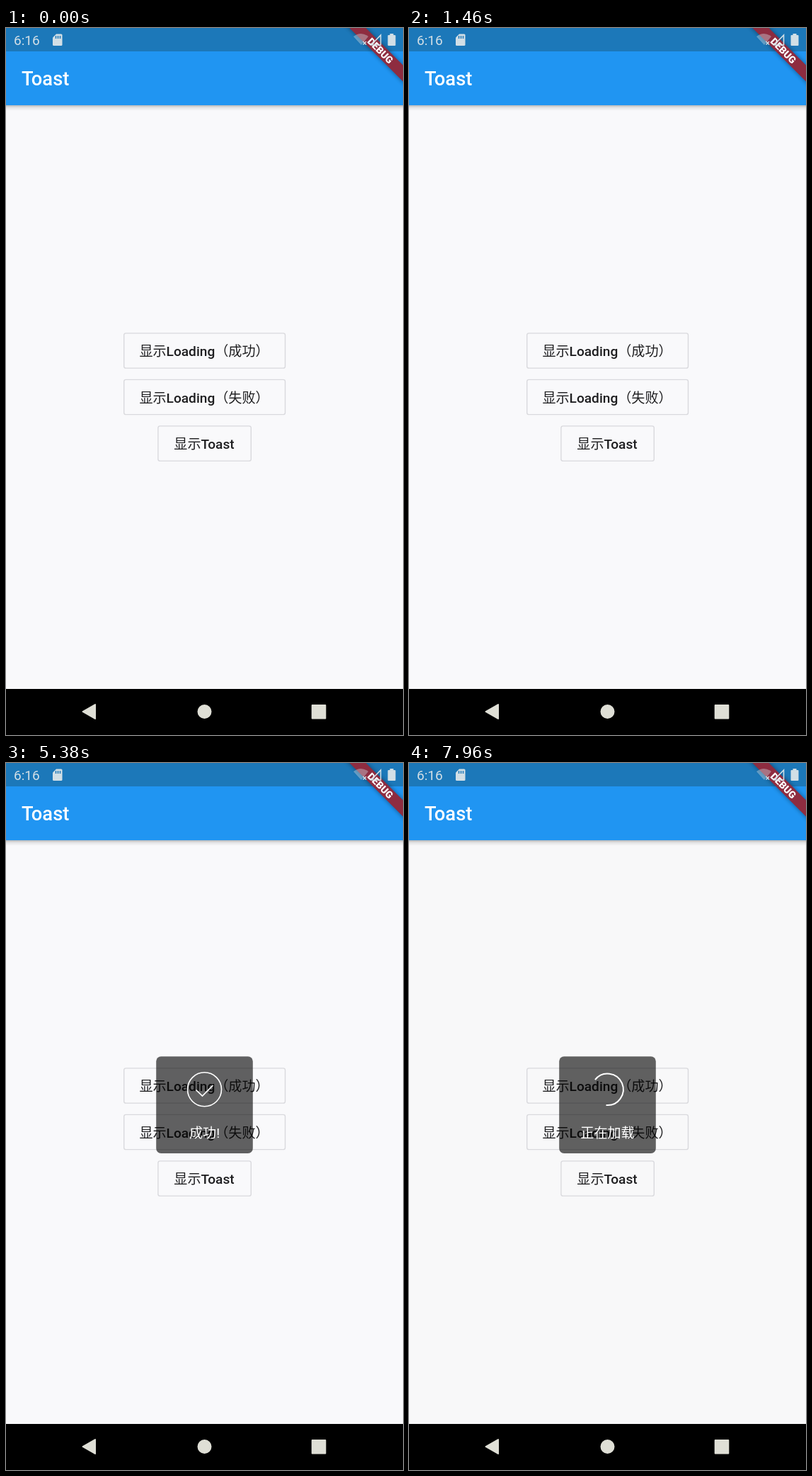
An HTML page for the animation above (8 s loop, 561 by 998 pixels).

```html
<!DOCTYPE html>
<html lang="zh-CN">
<head>
<meta charset="utf-8">
<title>Toast</title>
<style>
  html, body { margin: 0; width: 100%; height: 100%; overflow: hidden; background: #000; }
  svg { display: block; width: 100vw; height: 100vh; }
  text { font-family: Roboto, "Noto Sans CJK SC", "Noto Sans CJK", sans-serif; font-size: 19.1px; }
  .label { font-weight: 500; fill: #1e1e20; text-anchor: middle; }
  .label tspan { font-weight: 400; }
  .outline { fill: none; stroke-width: 1.37; }
  .toast text { fill: #fff; text-anchor: middle; }
  .line { fill: none; stroke: #fff; }
</style>
</head>
<body>
<svg viewBox="0 0 561 998" preserveAspectRatio="none">
  <defs>
    <linearGradient id="shade" x2="0" y2="1">
      <stop stop-color="#000" stop-opacity=".26"/>
      <stop offset=".4" stop-color="#000" stop-opacity=".09"/>
      <stop offset="1" stop-color="#000" stop-opacity="0"/>
    </linearGradient>
    <filter id="soft" x="-20%" y="-100%" width="140%" height="300%">
      <feGaussianBlur stdDeviation="3"/>
    </filter>
  </defs>

  <rect id="page" width="561" height="998" fill="#f9f9fb"/>
  <rect y="109" width="561" height="8" fill="url(#shade)"/>
  <rect width="561" height="109" fill="#2095f2"/>
  <rect width="561" height="33" fill="#1c78b9"/>
  <text x="22" y="81" fill="#fff" style="font-size:27.3px;font-weight:500">Toast</text>

  <g id="buttons"></g>

  <g class="toast" id="toast">
    <rect x="212.2" y="414.3" width="136.6" height="136.6" rx="6.8" fill="#000" fill-opacity=".61"/>
    <g id="loading">
      <path id="arc" class="line" stroke-width="2"/>
      <text x="280.5" y="529">正在加载</text>
    </g>
    <g id="success">
      <circle class="line" cx="280.5" cy="460.8" r="24" stroke-width="1.6"/>
      <path class="line" d="M268.5 461.5L277.5 470L292.5 455" stroke-width="1.7"/>
      <text x="280.5" y="529">成功!</text>
    </g>
  </g>

  <g transform="translate(529 32) rotate(45)">
    <rect x="-90" y="-8.2" width="180" height="16.4" fill="#000" opacity=".42" filter="url(#soft)"/>
    <rect x="-90" y="-8.2" width="180" height="16.4" fill="#8e2c40"/>
    <text y="4.9" text-anchor="middle" fill="#fff" style="font-size:13.9px;font-weight:900">DEBUG</text>
  </g>

  <g fill="#d2dfe6">
    <text x="11" y="24">6:16</text>
    <path d="M71 8.5H78Q79.5 8.5 79.5 10V23.5Q79.5 25 78 25H67.500Q66 25 66 23.500V13.500Z"/>
    <path d="M70.500 11v4M73.500 11v4M76.500 11v4" stroke="#1c78b9" stroke-width="1.5"/>
    <path d="M491 12Q501.500 4 512 12L507 18L502 24Z" opacity=".4"/>
    <path d="M504.500 19l4.500 4.500m0-4.500l-4.500 4.500" stroke="#d2dfe6" stroke-width="1.5"/>
    <path d="M516 24L529.500 10V24Z" fill="none" stroke="#d2dfe6" stroke-width="1.6"/>
    <path d="M542.500 8h5v2H549.500Q550.500 10 550.500 11V24Q550.500 25 549.500 25H540.500Q539.500 25 539.500 24V11Q539.500 10 540.500 10H542.500Z"/>
  </g>

  <rect y="933" width="561" height="65"/>
  <g fill="#dfdfd6" stroke="#dfdfd6" stroke-width="2" stroke-linejoin="round">
    <path d="M108.500 965L126 955V975Z"/>
    <circle cx="280.500" cy="965" r="9"/>
    <rect x="432.700" y="956" width="18.600" height="18.600"/>
  </g>
</svg>
<script>
const LOOP = 8000;
const LOADING = [[3070, 5070], [6660, LOOP]];
const SUCCESS = [5070, 6080];
const BUTTONS = [
  { x: 166.7, y: 430.9, w: 227.8, label: '<tspan>显示</tspan>Loading<tspan>（成功）</tspan>',
    press: { down: 2400, splash: 2430, up: 3055, x: 254, y: 462 } },
  { x: 166.7, y: 496.4, w: 227.8, label: '<tspan>显示</tspan>Loading<tspan>（失败）</tspan>',
    press: { down: 6600, splash: 6600, up: 6650, x: 280, y: 524 } },
  { x: 214.9, y: 561.9, w: 131.4, label: '<tspan>显示</tspan>Toast' }
];
const HEIGHT = 49.2, SPLASH_RADIUS = 142;

const $ = id => document.getElementById(id);
const clamp = v => Math.max(0, Math.min(1, v));
const within = (t, [from, to]) => t >= from && t < to;
const show = (node, on) => node.setAttribute('visibility', on ? 'visible' : 'hidden');

$('buttons').innerHTML = BUTTONS.map((b, i) => {
  const box = `x="${b.x}" y="${b.y}" width="${b.w}" height="${HEIGHT}" rx="2.7"`;
  return `<clipPath id="clip${i}"><rect ${box}/></clipPath>
    <rect id="fill${i}" ${box} opacity="0"/>
    <circle id="splash${i}" clip-path="url(#clip${i})" opacity="0"/>
    <rect id="edge${i}" class="outline" ${box}/>
    <text class="label" x="280" y="${b.y + 32.3}">${b.label}</text>`;
}).join('');

function drawButton({ press }, i, t) {
  const pressed = press && t >= press.down && t < press.up;
  $('edge' + i).setAttribute('stroke', pressed ? '#2b98e6' : '#d9d9dd');
  if (!press) return;
  const { down, splash, up, x, y } = press;
  const fade = 1 - clamp((t - up) / 200);
  const held = clamp((Math.min(t, up) - splash) / 1000);
  const grown = held + (1 - held) * clamp((t - up) / 140);
  $('fill' + i).setAttribute('opacity', 0.06 * clamp((t - down) / 90) * fade);
  const spot = $('splash' + i);
  spot.setAttribute('cx', x);
  spot.setAttribute('cy', y);
  spot.setAttribute('r', SPLASH_RADIUS * grown);
  spot.setAttribute('opacity', t >= splash ? 0.11 * fade : 0);
}

// cubic-bezier(.4, 0, .2, 1), solved by bisection
function ease(x) {
  let low = 0, high = 1;
  for (let i = 0; i < 24; i++) {
    const s = (low + high) / 2, r = 1 - s;
    if (1.2 * r * r * s + 0.6 * r * s * s + s ** 3 < x) low = s; else high = s;
  }
  return low * low * (3 - 2 * low);
}

function drawSpinner(elapsed) {
  const step = Math.floor(elapsed / 1000), phase = elapsed / 1000 - step;
  const head = ease(clamp(phase * 2)), tail = ease(clamp(phase * 2 - 1));
  const start = -90 + tail * 270 + phase * 306 - step * 144;
  const sweep = Math.max((head - tail) * 270, 0.1);
  const point = deg => {
    const a = deg * Math.PI / 180;
    return `${280.5 + 22.3 * Math.cos(a)} ${460.8 + 22.3 * Math.sin(a)}`;
  };
  $('arc').setAttribute('d',
    `M${point(start)}A22.3 22.3 0 ${sweep > 180 ? 1 : 0} 1 ${point(start + sweep)}`);
}

function draw(t) {
  const loading = LOADING.find(span => within(t, span));
  const success = within(t, SUCCESS);
  $('page').setAttribute('fill', loading ? '#f8f8f9' : '#f9f9fb');
  BUTTONS.forEach((b, i) => drawButton(b, i, t));
  show($('toast'), loading || success);
  show($('loading'), loading);
  show($('success'), success);
  if (loading) drawSpinner(t - loading[0]);
}

const begin = performance.now();
function tick() {
  draw((performance.now() - begin) % LOOP);
  requestAnimationFrame(tick);
}
tick();
</script>
</body>
</html>
```
